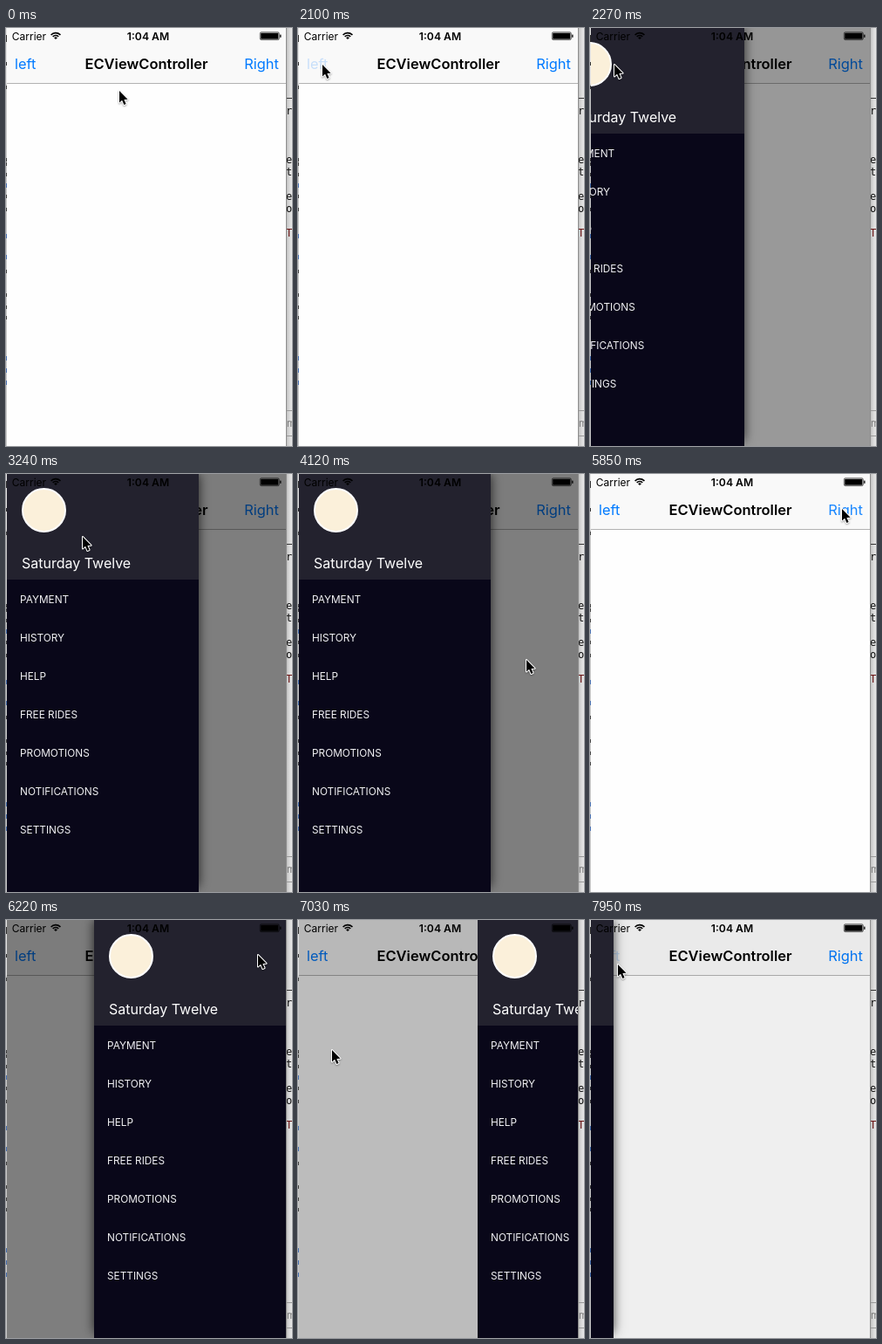
Recreate the animation shown at these times as an HTML page with a canvas. Size 328 px wide and 479 px high, loop 8 s.

```html
<!DOCTYPE html>
<html lang="en">
<head>
<meta charset="utf-8">
<title>Side drawers</title>
<style>
html, body { margin: 0; width: 100%; height: 100%; overflow: hidden; background: #fff; }
canvas { display: block; width: 328px; height: 479px; }
</style>
</head>
<body>
<canvas id="stage"></canvas>
<script>
const W = 328, H = 479, LOOP = 8000;
const LEFT = 1, RIGHT = 321, DRAWER = 220;
const LEFT_CLOSE = 4333, RIGHT_CLOSE = 6934, LEFT_REOPEN = 7906;
const SANS = 'Inter, Roboto, sans-serif';
const MONO = '"DejaVu Sans Mono", monospace';
const BLUE = '#007aff';
const ITEMS = ['PAYMENT', 'HISTORY', 'HELP', 'FREE RIDES', 'PROMOTIONS', 'NOTIFICATIONS', 'SETTINGS'];

// Pointer moves: start, end, three curve points, optional timing power
const MOVES = [
  [960, 1470, [130, 72], [72, 12], [28, 42]],
  [2915, 3500, [28, 42], [115, 59], [134, 172], 1.4],
  [3760, 4120, [134, 172], [210, 190], [262, 213]],
  [4620, 5130, [262, 213], [292, 130], [290, 32]],
  [5240, 5490, [290, 32], [290, 36], [289, 40]],
  [6415, 6730, [289, 40], [150, 60], [39, 149]],
  [7230, 7680, [39, 149], [42, 95], [32, 51]]
];

const canvas = document.getElementById('stage');
const ctx = canvas.getContext('2d');
const dpr = window.devicePixelRatio || 1;
canvas.width = W * dpr;
canvas.height = H * dpr;

const ramp = (t, start, length) => Math.min(1, Math.max(0, (t - start) / length));
const swing = u => 0.5 - 0.5 * Math.cos(Math.PI * u);
const slide = (t, start) => swing(ramp(t, start, 200));

function rect(x, y, w, h, color) {
  ctx.fillStyle = color;
  ctx.fillRect(x, y, w, h);
}

function text(str, x, y, font, color, align = 'left') {
  ctx.font = font;
  ctx.fillStyle = color;
  ctx.textAlign = align;
  ctx.fillText(str, x, y);
}

function pointerAt(t) {
  let [x, y] = MOVES[0][2];
  for (const [start, end, a, b, c, power = 1] of MOVES) {
    if (t < start) break;
    const u = swing(Math.pow(ramp(t, start, end - start), power));
    const curve = i => (1 - u) ** 2 * a[i] + 2 * u * (1 - u) * b[i] + u * u * c[i];
    x = curve(0);
    y = curve(1);
  }
  return [Math.round(x), Math.round(y)];
}

function drawDesktop() {
  rect(0, 0, W, H, '#e4e4e4');
  for (const y of [8, 12, 39, 66, 149, 154, 166, 191, 206, 277, 304, 318, 330]) rect(0, y, 1, 4, '#333');
  for (const y of [178, 236, 260, 376, 390, 404]) rect(0, y, 1, 5, '#3a6fc4');

  const shade = ctx.createLinearGradient(RIGHT, 0, W, 0);
  shade.addColorStop(0, '#b4b4b4');
  shade.addColorStop(0.4, '#d2d2d2');
  shade.addColorStop(1, '#e8e8e8');
  rect(RIGHT, 0, W - RIGHT, H, shade);
  rect(RIGHT, 80, W - RIGHT, 1, '#333');
  const code = [['r', 99], ['e', 155], ['t', 169], ['e', 197], ['o', 211]];
  for (const [ch, y] of code) text(ch, 321, y, '12px ' + MONO, '#111');
  text('T', 321, 239, '12px ' + MONO, '#6b1717');
  rect(RIGHT, 438, W - RIGHT, 1, '#999');
  rect(RIGHT, 467, W - RIGHT, 1, '#999');
  text('m', 322, 457, '11px ' + SANS, '#777');
}

function drawScreen(leftAlpha, rightAlpha) {
  rect(LEFT, 0, RIGHT - LEFT, H, '#fefefe');
  rect(LEFT, 0, RIGHT - LEFT, 63, '#f9f9f9');
  rect(LEFT, 63, RIGHT - LEFT, 1, '#b2b2b2');
  text('ECViewController', 161, 47, '600 16.5px ' + SANS, '#000', 'center');
  ctx.globalAlpha = leftAlpha;
  text('left', 10, 47, '16.4px ' + SANS, BLUE);
  ctx.globalAlpha = rightAlpha;
  text('Right', 312.8, 47, '16.4px ' + SANS, BLUE, 'right');
  ctx.globalAlpha = 1;
}

function drawDrawer(x, shadow) {
  if (shadow) {
    ctx.save();
    ctx.shadowColor = 'rgba(0,0,0,.75)';
    ctx.shadowBlur = 12 * dpr;
    rect(x, 0, DRAWER, H - 6, '#000');
    ctx.restore();
  }
  rect(x, 0, DRAWER, H, '#090719');
  rect(x, 0, DRAWER, 121, '#23222e');

  ctx.beginPath();
  ctx.arc(x + 42.5, 41.5, 24.5, 0, Math.PI * 2);
  ctx.fillStyle = '#fbf0da';
  ctx.fill();
  ctx.lineWidth = 2;
  ctx.strokeStyle = '#fff';
  ctx.stroke();

  text('Saturday Twelve', x + 17, 108, '16px ' + SANS, '#fff');
  ITEMS.forEach((item, i) => text(item, x + 15, 148 + i * 44, '11.8px ' + SANS, '#f2f2f4'));
}

function drawStatus() {
  text('Carrier', 6.8, 13.6, '12px ' + SANS, '#000');
  text('1:04 AM', 163, 13.6, '600 12.2px ' + SANS, '#000', 'center');

  ctx.strokeStyle = '#000';
  ctx.lineWidth = 1.6;
  for (const r of [4.5, 7.4]) {
    ctx.beginPath();
    ctx.arc(57, 13, r, -Math.PI * 0.76, -Math.PI * 0.24);
    ctx.stroke();
  }
  ctx.beginPath();
  ctx.moveTo(57, 13);
  ctx.arc(57, 13, 2.6, -Math.PI * 0.76, -Math.PI * 0.24);
  ctx.fillStyle = '#000';
  ctx.fill();

  ctx.lineWidth = 0.6;
  ctx.beginPath();
  ctx.roundRect(291.3, 4.8, 22, 8.8, 1.6);
  ctx.stroke();
  rect(292.2, 5.7, 20.2, 7, '#000');
  rect(314.2, 7.6, 1.3, 3.2, '#000');
}

function drawPointer(x, y) {
  const shape = [[0, 0], [0, 13.6], [3.1, 10.7], [5.4, 16], [7.6, 15], [5.4, 9.9], [9.6, 9.7]];
  ctx.save();
  ctx.translate(x, y);
  ctx.beginPath();
  shape.forEach(([px, py]) => ctx.lineTo(px, py));
  ctx.closePath();
  ctx.lineJoin = 'round';
  ctx.lineWidth = 2;
  ctx.strokeStyle = '#fff';
  ctx.shadowColor = 'rgba(0,0,0,.35)';
  ctx.shadowBlur = 2 * dpr;
  ctx.shadowOffsetY = dpr;
  ctx.stroke();
  ctx.shadowColor = 'transparent';
  ctx.fillStyle = '#000';
  ctx.fill();
  ctx.restore();
}

function draw(t) {
  const left = slide(t, 2130) - slide(t, LEFT_CLOSE) + slide(t, LEFT_REOPEN);
  const right = slide(t, 6020) - slide(t, RIGHT_CLOSE);
  const leftPressed = (t >= 2100 && t < 2340) || t >= 7800;
  const rightAlpha = t < 5850 || t >= 6230 ? 1 : t < 5880 ? 0.9 : 0.2;

  ctx.setTransform(dpr, 0, 0, dpr, 0, 0);
  drawDesktop();
  ctx.save();
  ctx.beginPath();
  ctx.rect(LEFT, 0, RIGHT - LEFT, H);
  ctx.clip();
  drawScreen(leftPressed ? 0.2 : 1, rightAlpha);
  const open = Math.max(left, right);
  if (open > 0) rect(LEFT, 0, RIGHT - LEFT, H, `rgba(0,0,0,${open * 0.5})`);
  if (left > 0) drawDrawer(LEFT + Math.round((left - 1) * DRAWER), t < LEFT_CLOSE || t > LEFT_REOPEN);
  if (right > 0) drawDrawer(RIGHT - Math.round(right * DRAWER), t < RIGHT_CLOSE);
  drawStatus();
  ctx.restore();
  rect(0, 64, 1, H, 'rgba(120,120,120,.25)');
  rect(RIGHT, 0, 1, H, '#8e8e8e');
  drawPointer(...pointerAt(t));
}

const began = performance.now();
function tick() {
  draw((performance.now() - began) % LOOP);
  requestAnimationFrame(tick);
}
tick();
</script>
</body>
</html>
```
